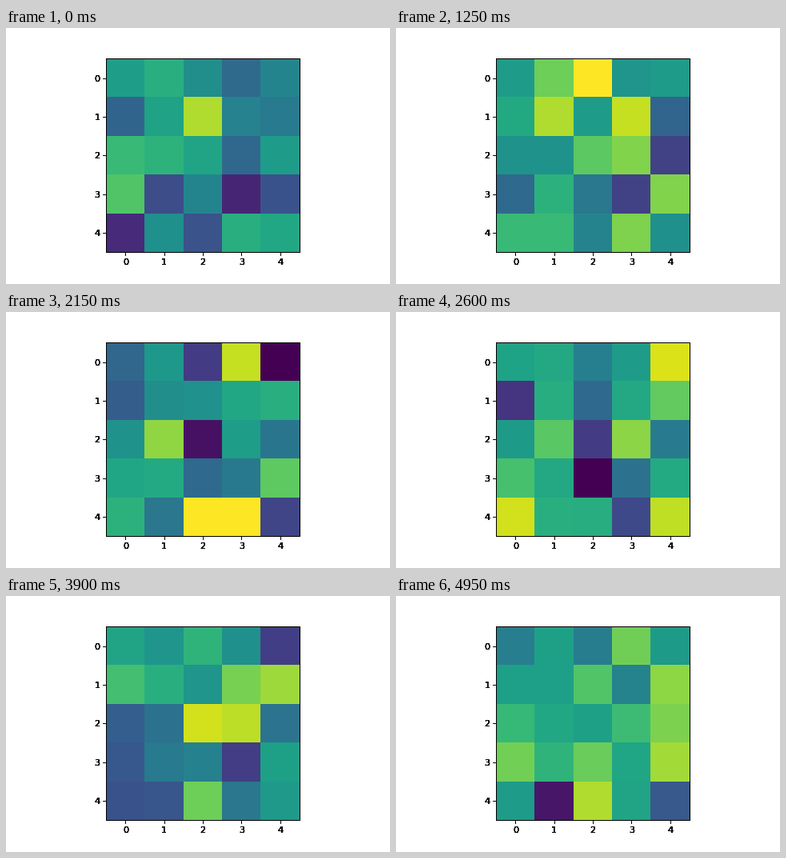
Animation of 480x320 px, one loop 5 s. Source, as a matplotlib script:

```python
import numpy as np
import matplotlib.pyplot as plt
from matplotlib.animation import FuncAnimation

WIDTH, HEIGHT, DPI = 480, 320, 80
FRAMES, STEP_MS = 100, 50
SIZE = 5
LEFT, BOTTOM, SIDE = 125.2, 40, 241.6
OVERLAYS = 6

plt.rcParams["font.family"] = "DejaVu Sans"

# Every step shows fresh noise, clipped to the colour range.
rng = np.random.default_rng(7)
grids = np.clip(rng.normal(0.56, 0.24, (FRAMES, SIZE, SIZE)), 0, 1)

fig = plt.figure(figsize=(WIDTH / DPI, HEIGHT / DPI), dpi=DPI, facecolor="white")


def add_grid_axes():
    ax = fig.add_axes([LEFT / WIDTH, BOTTOM / HEIGHT, SIDE / WIDTH, SIDE / HEIGHT])
    ax.set(xlim=(-0.5, SIZE - 0.5), ylim=(SIZE - 0.5, -0.5),
           xticks=range(SIZE), yticks=range(SIZE))
    return ax


ax = add_grid_axes()
image = ax.imshow(grids[0], cmap="viridis", vmin=0, vmax=1,
                  interpolation="nearest", aspect="auto")

# Stacked transparent axes thicken the soft edges of labels and frame.
for _ in range(OVERLAYS):
    add_grid_axes().patch.set_visible(False)


def update(i):
    image.set_data(grids[i])
    return [image]


anim = FuncAnimation(fig, update, frames=FRAMES, interval=STEP_MS,
                     repeat=True, repeat_delay=0, blit=False)
plt.show()
```
